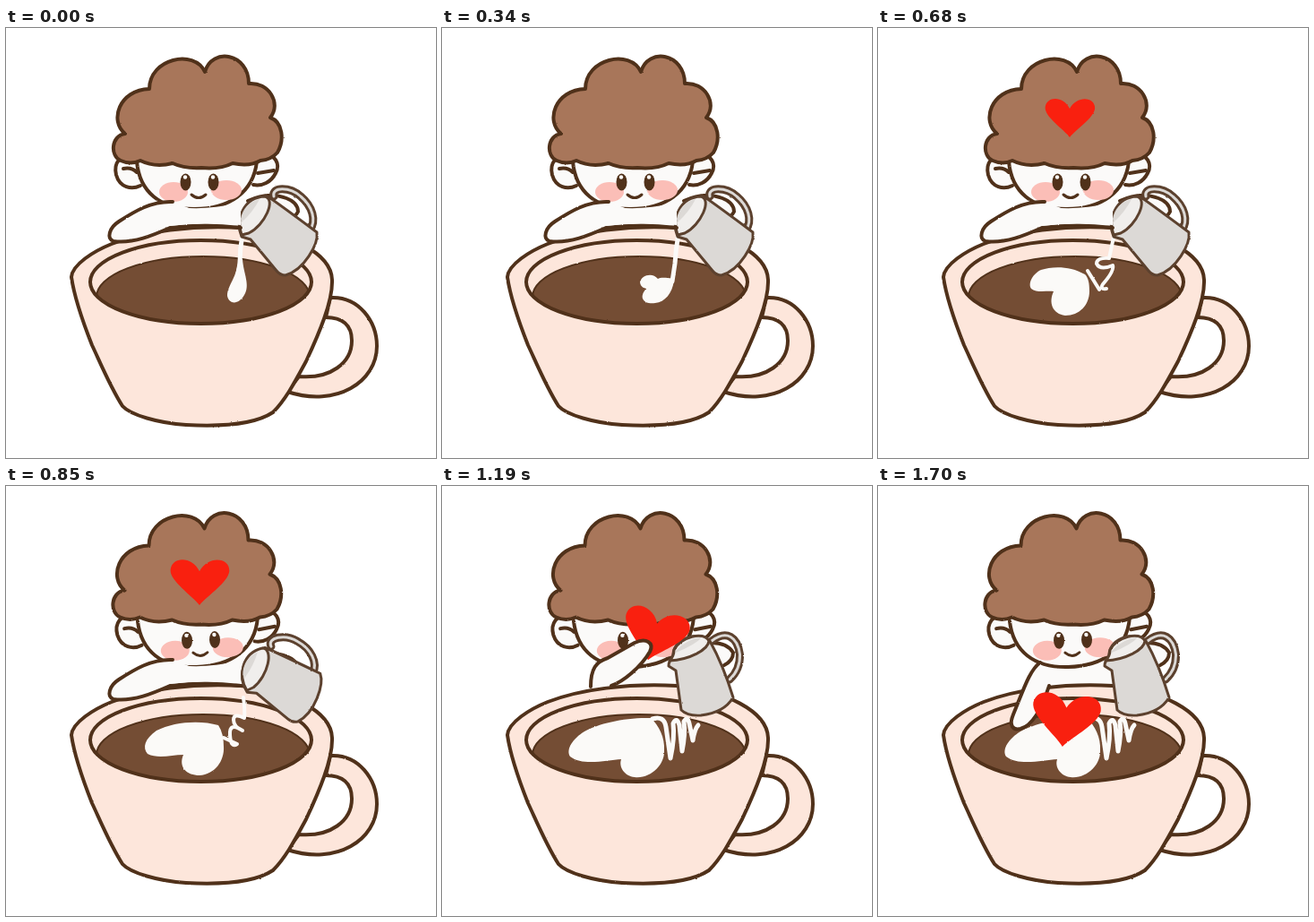
An HTML page that plays this animation: 480 by 480 pixels, repeating every 2040 ms.

```html
<!DOCTYPE html>
<html lang="en">
<head>
<meta charset="utf-8">
<title>Latte heart</title>
<style>
  html, body { margin: 0; width: 100%; height: 100%; overflow: hidden; background: #fff; }
  svg { display: block; width: 100%; height: 100%; }
  .line { fill: none; stroke: #50311a; stroke-width: 4; stroke-linecap: round; stroke-linejoin: round; }
  .skin { fill: #fbfaf9; }
  .hair { fill: #a8765a; }
  .cup { fill: #fde6db; }
  .coffee { fill: #744d34; }
  .milk { fill: #fbfaf8; }
  .pour { fill: none; stroke: #fbfaf8; stroke-width: 5; stroke-linecap: round; stroke-linejoin: round; }
  .thin { stroke-width: 4; }
  .steel { fill: #dcd9d6; }
  .shine { fill: #f0eeec; }
  .jug .line { stroke: #5c412e; stroke-width: 3; }
  .jug .grip { stroke-width: 9; }
  .jug .grip + .line { stroke: #dcd9d6; }
  .cheek { fill: #fbbeb7; }
  .dark { fill: #50311a; }
  #heart { fill: #f9200f; }
</style>
</head>
<body>
<svg viewBox="0 -1 480 480">
  <defs>
    <filter id="rough" filterUnits="userSpaceOnUse" x="0" y="-1" width="480" height="480" color-interpolation-filters="sRGB">
      <feTurbulence id="grain" type="fractalNoise" baseFrequency=".3" numOctaves="2"/>
      <feDisplacementMap in="SourceGraphic" scale="1.6" xChannelSelector="R" yChannelSelector="G"/>
    </filter>
    <clipPath id="bowl"><ellipse cx="217.500" cy="282.500" rx="123" ry="46.500"/></clipPath>
  </defs>

  <g filter="url(#rough)">
    <path class="skin" d="M172 196Q215 186 290 190L302 235H166Z"/>

    <!-- head -->
    <g id="face">
      <path class="line skin" d="M146 142C126 138 120 151 123 163C127 177 140 180 150 175"/>
      <path class="line skin" d="M285 142C302 138 306 152 301 161C296 171 286 176 276 174"/>
      <path class="line skin" d="M146 148C149 182 172 201 210 201C249 201 276 183 280 148"/>
      <path class="line" d="M131 156Q140 154 146 160M281 161L299 158"/>
      <ellipse class="cheek" cx="187" cy="182" rx="16" ry="11"/>
      <ellipse class="cheek" cx="246" cy="180" rx="17" ry="11"/>
      <ellipse class="dark" cx="200.500" cy="171" rx="6" ry="9.500"/>
      <ellipse class="dark" cx="231.500" cy="171" rx="6" ry="9.500"/>
      <circle class="milk" cx="200" cy="165.500" r="2.200"/>
      <circle class="milk" cx="231" cy="165.500" r="2.200"/>
      <path class="line" style="stroke-width:3" d="M207 185Q215 192 223 185"/>
    </g>
    <path id="hair" class="line hair" d="M133 117C117 119 116 142 128 147Q139 152 150 147Q166 155 186 150Q199 156 218 155Q239 157 253 150Q272 154 284 147Q296 146 303 138C311 124 309 104 295 99C308 83 293 59 271 61C271 27 230 20 222 48C210 22 160 33 160 67C126 68 115 103 133 117Z"/>

    <!-- cup -->
    <path class="line cup" d="M362 300C394 298 414 327 414 354C414 394 369 423 314 405L327 388C362 391 386 373 386 348C386 330 375 322 357 322Z"/>
    <path class="line cup" d="M73 277C74 263 98 248 118 240C154 226 208 219 262 222C315 227 363 250 364 280C365 304 349 341 335 371C322 395 312 414 298 428C277 442 238 444 201 442C170 440 139 431 130 421C116 399 105 372 96 353C83 320 76 298 73 277Z"/>
    <g clip-path="url(#bowl)">
      <ellipse class="coffee" cx="220" cy="299" rx="119" ry="45"/>
      <ellipse class="line" style="stroke-width:2" cx="220" cy="299" rx="119" ry="45"/>
    </g>
    <ellipse class="line" cx="217.500" cy="282.500" rx="123.500" ry="46.500"/>

    <!-- milk on the coffee -->
    <path data-on="0" class="milk" d="M259 257C259 276 247 286 247 298C249 308 260 308 266 297C273 286 265 273 264 257Z"/>
    <path data-on="1" class="milk" d="M257 279C248 277 243 278 241 279C235 271 222 275 221 283C222 289 226 289 228 290C218 301 227 308 238 306C249 305 257 295 259 281Z"/>
    <path data-on="2" class="milk" d="M257 279C248 277 243 278 241 279C235 271 222 275 221 283C222 289 226 289 228 290C218 301 227 308 238 306C249 305 257 295 259 281Z"/>
    <path data-on="3" class="milk" d="M246 263C233 265 227 265 222 267C206 267 194 281 196 290C201 296 217 292 227 291C230 299 230 313 244 315C259 314 268 299 267 287C264 276 256 268 246 263Z"/>
    <path data-on="4" class="milk" d="M231 274C214 264 194 265 182 269C173 273 167 284 171 290C177 295 188 292 196 293C190 306 195 318 209 320C225 320 236 308 236 293C236 284 235 278 231 274Z"/>
    <path data-on="5" class="milk" d="M237 266C217 260 187 262 168 272C155 281 152 291 158 298C170 304 185 299 198 299C192 313 202 322 216 322C233 321 244 306 243 290Q243 275 237 266Z"/>
    <path data-on="6789a" class="milk" d="M233 258C205 257 175 264 159 273C146 281 138 293 143 301C157 312 184 305 200 304C197 313 204 323 215 324C233 326 249 310 248 294C249 280 242 266 233 258Z"/>
    <path data-on="5" class="pour thin" d="M265 235Q267 250 266 258Q254 252 254 260T264 272Q249 262 250 277T258 287L243 280"/>
    <path data-on="6789a" class="pour" d="M235 259Q248 255 250 268L255 303Q260 280 258 264Q262 256 265 266L268 295Q272 275 270 262Q274 255 276 264L280 283Q282 270 286 266"/>

    <!-- stream -->
    <path data-on="0" class="pour" d="M264 229Q261 245 261 262L258 278"/>
    <path data-on="12" class="pour" d="M264 229Q261 245 260 262L257 282"/>
    <path data-on="3" class="pour thin" d="M268 230Q266 256 270 275Q273 290 265 282Q256 266 249 269"/>
    <path data-on="4" class="pour thin" d="M264 228L258 256Q244 255 244 262Q248 270 262 264Q264 270 251 285Q247 291 255 290M234 270L247 291"/>

    <!-- right hand and jug -->
    <path data-on="012345" class="line skin" d="M270 192Q293 181 313 189Q326 194 326 204Q322 213 309 211"/>
    <path data-on="6789a" class="line skin" d="M298 174Q318 173 325 185Q325 194 315 199"/>
    <g id="tilted" class="jug" data-on="012345">
      <path class="line grip" d="M299 187C296 176 317 176 329 187C342 198 347 214 339 225"/>
      <path class="line" d="M299 187C296 176 317 176 329 187C342 198 347 214 339 225"/>
      <path class="line steel" d="M292 187Q300 192 347 227C349 240 333 269 312 275Q306 275 302 270L273 235L263 232C256 215 263 189 292 187Z"/>
      <path class="line shine" d="M263 230C256 211 266 188 289 187C302 190 289 219 271 228Z"/>
      <path class="steel" d="M262 212Q265 195 283 190Q276 204 263 216Z"/>
    </g>
    <g class="jug" data-on="6789a">
      <path class="line grip" d="M301 172C318 159 330 168 332.500 187Q333 204 321 215"/>
      <path class="line" d="M301 172C318 159 330 168 332.500 187Q333 204 321 215"/>
      <path class="line steel" d="M299 172Q314 199 325 235Q315 252 289 255Q274 256 267 249L261 205L253 200Q253 194 258 190C256 171 283 159 299 172Z"/>
      <path class="line shine" d="M254 194Q259 189 259 182C266 168 292 160 298 172C297 182 276 193 254 194Z"/>
      <path class="steel" d="M261 183Q274 169 290 168Q283 176 261 185Z"/>
    </g>
    <path data-on="6" class="line" style="stroke-width:2" d="M262 215L268 221"/>

    <!-- left arm and heart -->
    <path data-on="a" class="line skin" d="M181 196C169 205 163 225 151 254C146 266 150 272 159 270C174 266 184 244 191 222"/>
    <path id="heart" d="M0 29C-9 17 -37 -1 -36 -15C-34 -32 -9 -32 0 -13C10 -33 38 -31 37 -13C35 1 11 16 0 29Z"/>
    <path data-on="012345" class="line skin" d="M186 193C162 192 143 204 126 215C115 222 112 234 120 237C142 240 165 230 183 222Q221 217 262 222"/>
    <path data-on="012345" class="skin" d="M184 195Q205 206 262 194V219Q220 215 182 220Z"/>
    <path data-on="6" class="line skin" d="M166 223C166 204 172 194 184 181C194 164 204 149 216 146C227 144 225 160 219 177C209 198 197 210 187 221"/>
    <path data-on="7" class="line skin" d="M166 223C166 203 172 195 185 191L215 174C228 168 237 174 232 184C222 201 203 217 189 222"/>
    <path data-on="8" class="line skin" d="M166 223Q164 200 175 197M199 204C218 207 235 228 241 244C243 253 235 257 225 253C206 249 187 236 170 225"/>
    <path data-on="9" class="line skin" d="M171 222Q169 204 180 196M203 212C211 226 215 244 211 259C207 271 195 268 190 257L175 225"/>
  </g>
</svg>
<script>
  const BEAT = 170, LOOP = 2040, LAST = 10;
  // heart pose per beat: x, y, scale, angle
  const heartPose = {
    3: [216, 108, .59, 0], 4: [214, 99, .76, 0], 5: [216, 106, .9, 0],
    6: [217, 115, 1.03, 0], 7: [237, 165, 1, 14], 8: [248, 219, .98, 30],
    9: [230, 243, 1, 18], 10: [209, 260, 1.04, 6]
  };
  const $ = id => document.getElementById(id);
  const parts = [...document.querySelectorAll("[data-on]")];
  const show = (el, on) => { el.style.display = on ? "" : "none"; };
  const place = (id, value) => $(id).setAttribute("transform", value);
  let shown = -1;

  function pose(beat) {
    const key = beat.toString(16);
    parts.forEach(el => show(el, el.dataset.on.includes(key)));

    const lean = beat > 4 || beat % 2 === 1;
    place("face", lean ? "translate(1.5 0) rotate(-1.500 213 170)" : "");
    place("hair", lean ? "translate(-.5 -1.500)" : "");
    place("tilted", lean ? "translate(4 -2) rotate(-11 260 220)" : "");
    $("grain").setAttribute("seed", lean ? 5 : 2);

    const h = heartPose[beat];
    show($("heart"), h);
    if (h) place("heart", `translate(${h[0]} ${h[1]}) rotate(${h[3]}) scale(${h[2]})`);
  }

  function tick() {
    const beat = Math.min(LAST, Math.floor(performance.now() % LOOP / BEAT));
    if (beat !== shown) pose(shown = beat);
    requestAnimationFrame(tick);
  }
  tick();
</script>
</body>
</html>
```
